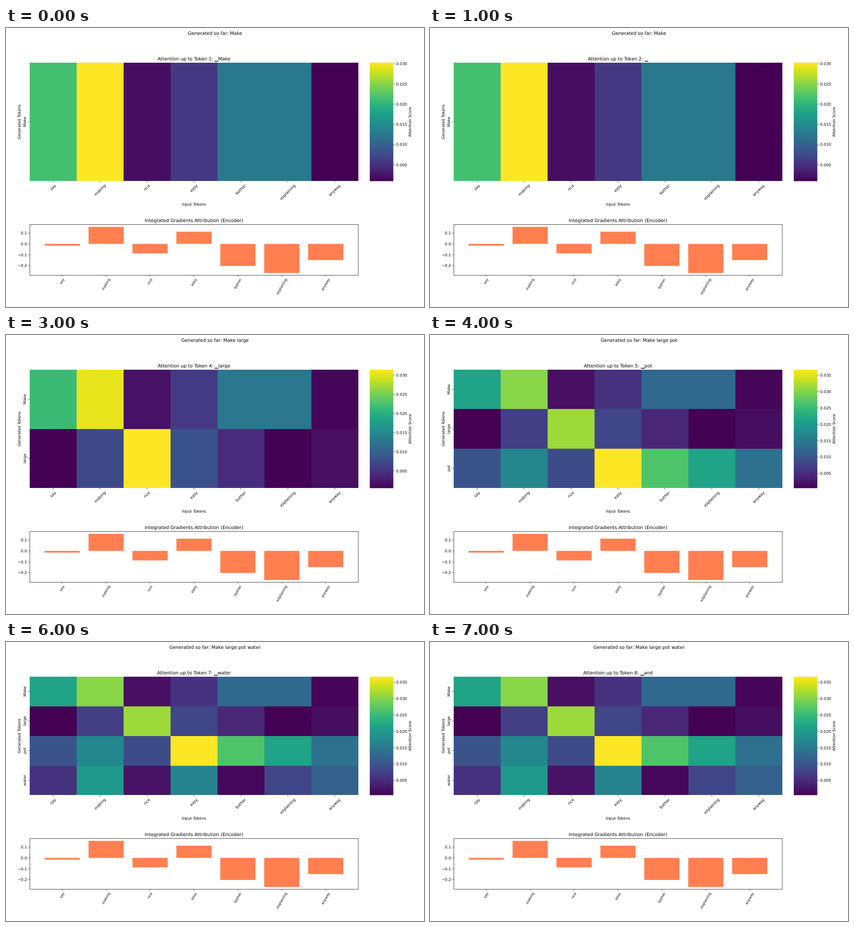
These frames come from a looping animation (917 by 611 pixels, 8 s). An HTML page:

```html
<!DOCTYPE html>
<html lang="en">
<head>
<meta charset="utf-8">
<title>Attention heatmap</title>
<style>
  html, body { margin: 0; width: 100%; height: 100%; overflow: hidden; background: #fff; }
  svg { display: block; width: 100%; height: 100%; }
  text { font: 8.49px "DejaVu Sans", sans-serif; text-rendering: geometricPrecision; }
  text.title { font-size: 10.19px; }
  text.small { font-size: 7.64px; }
  line, .frame { stroke: #000; stroke-width: .75; fill: none; }
  .cell { shape-rendering: crispEdges; }
</style>
</head>
<body>
<svg viewBox="0 0 917 611">
  <defs><linearGradient id="viridis" x1="0" y1="1" x2="0" y2="0"></linearGradient></defs>
  <g id="fixed"></g>
  <g id="live"></g>
</svg>
<script>
const LEFT = 52, WIDTH = 720.7, TOP = 75.9, BOTTOM = 335.4, MID = LEFT + WIDTH / 2;
const HEIGHT = BOTTOM - TOP, CELL = WIDTH / 7, BAR_X = 798, BAR_R = 849.7, EM = 8.49;
const BOX_TOP = 430.5, BOX_BOTTOM = 541.5;

const inputs = ["say", "making", "rice", "easy", "bother", "explaining", "anyway"];
const tokens = ["▁Make", "▁", "a", "▁large", "▁pot", "▁of", "▁water", "▁and"];
const rowsAt = [1, 1, 1, 2, 3, 3, 4, 4];
const rows = [
  ["Make", [.02147, .03027, .002, .0057, .01267, .01267, .00093]],
  ["large", [.0005, .0072, .03137, .0081, .0045, .00055, .0018]],
  ["pot", [.0098, .0172, .0088, .0367, .0266, .0215, .0139]],
  ["water", [.0056, .0198, .0022, .0166, .0012, .0079, .0115]]
];
const ranges = [null, [.00093, .03027], [.0005, .03137], [.00049, .0367], [.00049, .0367]];
const attribution = [-.016, .158, -.088, .113, -.204, -.2695, -.15];

const viridis = ("440154 471365 482475 463480 414487 3b528b 355f8d 2f6c8e 2a788e 25848e 21918c " +
  "1e9c89 22a884 2fb47c 44bf70 5ec962 7ad151 9bd93c bddf26 dfe318 fde725").split(" ")
  .map(h => [0, 2, 4].map(i => parseInt(h.substr(i, 2), 16)));

function color(t) {
  const p = Math.min(1, Math.max(0, t)) * 20, i = Math.min(19, Math.floor(p));
  return `rgb(${viridis[i].map((c, k) => Math.round(c + (viridis[i + 1][k] - c) * (p - i)))})`;
}

function add(parent, tag, attrs, content) {
  const el = document.createElementNS("http://www.w3.org/2000/svg", tag);
  for (const k in attrs) el.setAttribute(k, attrs[k]);
  if (content) el.textContent = content;
  return parent.appendChild(el);
}
const line = (g, x1, y1, x2, y2) => add(g, "line", { x1, y1, x2, y2 });
const rect = (g, x, y, width, height, attrs) => add(g, "rect", { x, y, width, height, ...attrs });
const text = (g, s, x, y, anchor = "middle", cls = "") =>
  add(g, "text", { x, y, "text-anchor": anchor, class: cls }, s);
const upright = (g, s, x, y) =>
  add(g, "text", { transform: `translate(${x} ${y}) rotate(-90)`, "text-anchor": "middle" }, s);

// Slanted tick label: its rotated box is centred on x and hangs from top.
function slanted(g, s, x, top, angle, size, cls) {
  const el = add(g, "text", { "text-anchor": "middle", y: .275 * size, class: cls }, s);
  const a = angle * Math.PI / 180;
  const h = el.getComputedTextLength() * Math.sin(a) + .98 * size * Math.cos(a);
  el.setAttribute("transform", `translate(${x} ${top + h / 2}) rotate(${-angle})`);
}

function drawFixed() {
  const g = document.getElementById("fixed"), grad = document.getElementById("viridis");
  for (let i = 0; i <= 20; i++) add(grad, "stop", { offset: i / 20, "stop-color": color(i / 20) });
  rect(g, BAR_X, TOP, BAR_R - BAR_X, HEIGHT, { fill: "url(#viridis)" });
  upright(g, "Attention Score", 889.2, TOP + HEIGHT / 2);
  upright(g, "Generated Tokens", 32.4, TOP + HEIGHT / 2);
  text(g, "Input Tokens", MID, 389.3);
  text(g, "Integrated Gradients Attribution (Encoder)", MID, 425.2, "middle", "title");

  const step = WIDTH / 7.48, zero = 472.8, unit = 236.5;
  inputs.forEach((word, i) => {
    const x = LEFT + CELL * (i + .5);
    line(g, x, BOTTOM, x, BOTTOM + 3);
    slanted(g, word, x, BOTTOM + 5.9, 45, EM, "");

    const bx = LEFT + step * (.74 + i), y = zero - attribution[i] * unit;
    rect(g, bx - step * .4, Math.min(y, zero), step * .8, Math.abs(y - zero), { fill: "#ff7f50" });
    line(g, bx, BOX_BOTTOM, bx, BOX_BOTTOM + 3);
    slanted(g, word, bx, BOX_BOTTOM + 5.9, 60, 7.64, "small");
  });
  for (const v of [.1, 0, -.1, -.2]) {
    const y = zero - v * unit;
    line(g, LEFT - 3, y, LEFT, y);
    text(g, v.toFixed(1).replace("-", "−"), LEFT - 5.9, y + 3.1, "end");
  }
  rect(g, LEFT + .2, BOX_TOP, WIDTH, BOX_BOTTOM - BOX_TOP, { class: "frame" });
}

function drawStep(n) {
  const g = document.getElementById("live"), count = rowsAt[n], [lo, hi] = ranges[count];
  const shown = rows.slice(0, count), h = HEIGHT / count;
  g.replaceChildren();
  text(g, "Generated so far: " + shown.map(r => r[0]).join(" "), 458.5, 14.9, "middle", "title");
  text(g, `Attention up to Token ${n + 1}: ${tokens[n]}`, MID, 70.8, "middle", "title");
  shown.forEach(([word, scores], r) => {
    const y = TOP + h * r, mid = y + h / 2;
    scores.forEach((v, c) => rect(g, LEFT + CELL * c, y, CELL, h,
      { class: "cell", fill: color((v - lo) / (hi - lo)) }));
    line(g, LEFT - 3, mid, LEFT, mid);
    upright(g, word, 44.4, mid);
  });
  for (let v = .005; v < hi; v += .005) {
    const y = BOTTOM - (v - lo) / (hi - lo) * HEIGHT;
    line(g, BAR_R, y, BAR_R + 3, y);
    text(g, v.toFixed(3), BAR_R + 6, y + 3.1, "start");
  }
}

let current = -1;
function tick() {
  const n = Math.floor(performance.now() / 1000) % 8;
  if (n !== current) drawStep(current = n);
  requestAnimationFrame(tick);
}
drawFixed();
tick();
</script>
</body>
</html>
```
